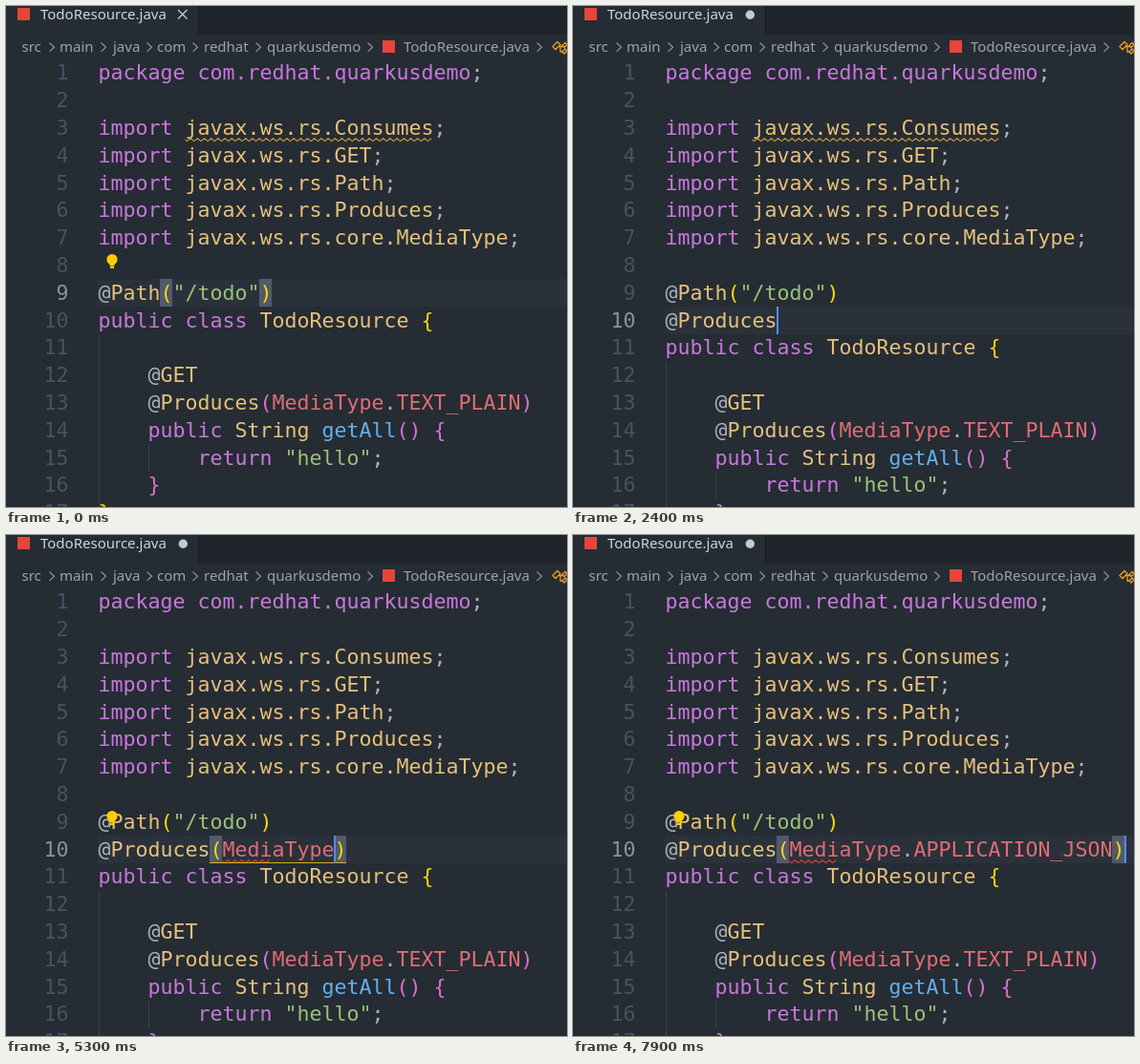
An HTML page that plays this animation: 587x525 px, repeating every 8000 ms.

```html
<!DOCTYPE html>
<html lang="en">
<head>
<meta charset="utf-8">
<title>Editor typing loop</title>
<style>
  html, body { margin: 0; width: 100%; height: 100%; overflow: hidden; background: #262c33; }
  svg { display: block; }
  text { white-space: pre; }
  .code { font: 21.6px "DejaVu Sans Mono", monospace; }
  .ui { font: 15px "Noto Sans", "Open Sans", sans-serif; }
  .match { font-weight: 700; fill: #d7dae0; }
</style>
</head>
<body>
<svg id="stage" width="587" height="525" viewBox="0 0 587 525"></svg>
<script>
const LOOP = 8000, SCALE = 1.2, LEFT = 96.4, CHAR = 13, LINE = 24 * SCALE;
const colors = {
  k: '#c678dd', y: '#e5c07b', g: '#abb2bf', s: '#98c379', r: '#e06c75',
  f: '#61afef', b: '#ffd70a', m: '#da70d6'
};
const colX = col => LEFT + col * CHAR;
const cellX = col => Math.round(colX(col));
const lineTop = n => Math.round(55.8 + LINE * (n - 1));
const baseline = n => Math.round(77.4 + LINE * (n - 1));

// A row is written as "color:text" pieces separated by "|".
const row = source => source ? source.split('|').map(p => [colors[p[0]], p.slice(2)]) : [];

const importRow = name => `k:import |y:javax.ws.rs.${name}|g:;`;
const head = [
  'k:package com.redhat.quarkusdemo|g:;', '',
  ...['Consumes', 'GET', 'Path', 'Produces', 'core.MediaType'].map(importRow), '',
  'g:@|y:Path|b:(|s:"/todo"|b:)'
];
const tail = [
  'k:public class |y:TodoResource |b:{', '',
  'g:    @|y:GET',
  'g:    @|y:Produces|m:(|r:MediaType|g:.|r:TEXT_PLAIN|m:)',
  'k:    public |y:String |f:getAll|m:() {',
  'k:        return |s:"hello"|g:;',
  'm:    }', 'b:}'
];

// Square brackets mark the letters that match what was typed.
const lists = {
  all: ['Override – java.lang', 'Deprecated – java.lang', 'Consumes – javax.ws.rs', 'GET – javax.ws.rs',
        'Path – javax.ws.rs', 'Produces – javax.ws.rs', 'Generated – javax.annotatio…'],
  p: ['[P]ath – javax.ws.rs', '[P]roduces – javax.ws.rs', '[P]arameters – org.junit.ru…', '[P]athParam – javax.ws.rs',
      '[P]rovider – javax.ws.rs.ext', '[P]riority – javax.annotation', '[P]ostConstruct – javax.ann…'],
  pro: ['[Pro]duces – javax.ws.rs', '[Pro]p – com.fasterxml.jacks…', '[Pro]pertyPrefix – com.arjun…',
        '[Pro]vider – javax.ws.rs.ext', '[Pro]xy – org.hibernate.anno…', '[Pr]i[o]rity – javax.annotation',
        'RestIs[Pro]duct – javax.mail…'],
  produ: ['[Produ]ces – javax.ws.rs', '[Produ]ces – javax.enterpris…'],
  medi: ['[Medi]aType – javax.ws.rs.core', '[Medi]a – javax.print.attribute', '[Medi]aName – javax.print.attr',
         '[Medi]aSize – javax.print.attr', '[Medi]aTray – javax.print.attr', '[Medi]aTracker – java.awt', '[Medi]aPrintableArea – javax'],
  fields: ['ATOM_XML', 'FORM_URLENCODED', 'JSON', 'JSON_PATCH_JSON', 'OCTET_STREAM', 'SVG_XML', 'XHTML_XML'].map(n => 'APPLICATION_' + n)
};
const jsonList = typed => ['', '_PATCH_JSON', '_TYPE', '_PATCH_JSON_TYPE']
  .map(end => `APPLICATION_[${typed}]${'JSON'.slice(typed.length)}${end}`);

const popup = (items, icon = 'interface') => ({ items, icon });
const args = inner => `g:@|y:Produces|b:(|${inner}|b:)`;

// Each step changes part of the editor state from its time on.
const steps = [
  [0, { line: null, row: 9, col: 14, pair: [5, 13], caret: false, dirty: false, bulb: 8,
        trail: true, warning: true, error: false, scope: false, popup: null }],
  [100, { caret: true }],
  [700, { line: '', row: 10, col: 0, pair: null }],
  [800, { dirty: true }],
  [1100, { line: 'g:@', col: 1 }],
  [1200, { line: 'r:@', bulb: 0 }],
  [1500, { popup: popup(lists.all) }],
  [1700, { line: 'g:@|y:p', col: 2, popup: popup(lists.p) }],
  [1800, { line: 'g:@|y:pro', col: 4, popup: popup(lists.pro) }],
  [2000, { line: 'g:@|y:produ', col: 6, popup: popup(lists.produ) }],
  [2400, { line: 'g:@|y:Produces', col: 9, popup: null }],
  [2500, { trail: false }],
  [3000, { line: 'g:@|y:Produces|r:()', col: 10, pair: [9, 10] }],
  [3300, { line: args('r:M'), col: 11, pair: [9, 11] }],
  [3400, { scope: true }],
  [3700, { line: args('r:Me'), col: 12, pair: [9, 12] }],
  [4000, { line: args('r:Medi'), col: 14, pair: [9, 14] }],
  [4200, { caret: false }],
  [4500, { popup: popup(null) }],
  [4700, { popup: popup(lists.medi, 'class'), trail: true, caret: true }],
  [4800, { bulb: 9 }],
  [5100, { warning: false, error: true }],
  [5300, { line: args('r:MediaType'), col: 19, pair: [9, 19], popup: null }],
  [5800, { caret: false }],
  [6000, { line: args('r:MediaType|g:.'), col: 20, pair: [9, 20], caret: true }],
  [6100, { popup: popup(lists.fields, 'constant') }],
  [6400, { line: args('r:MediaType|g:.j'), col: 21, pair: [9, 21], popup: popup(jsonList('J'), 'constant') }],
  [6500, { line: args('r:MediaType|g:.js'), col: 22, pair: [9, 22], popup: popup(jsonList('JS'), 'constant') }],
  [7100, { line: args('r:MediaType|g:.|r:APPLICATION_JSON'), col: 36, pair: [9, 36], popup: null, bulb: 0 }],
  [7500, { bulb: 9, caret: false }],
  [7900, { col: 37, caret: true, scope: false }]
];

const rect = (x, y, w, h, fill, more = '') => `<rect x="${x}" y="${y}" width="${w}" height="${h}" fill="${fill}" ${more}/>`;
const stroke = (d, color, width = 1.2) => `<path d="${d}" fill="none" stroke="${color}" stroke-width="${width}"/>`;
const circle = (x, y, r, fill, more = '') => `<circle cx="${x}" cy="${y}" r="${r}" fill="${fill}" ${more}/>`;
const text = (cls, x, y, fill, body, more = '') => `<text class="${cls}" x="${x}" y="${y}" fill="${fill}" ${more}>${body}</text>`;

function squiggle(from, to, line, color) {
  const bottom = lineTop(line + 1), half = 3 * SCALE, end = colX(to);
  let x = colX(from), d = `M${x} ${bottom - 2.2}`;
  x += 1.75 * SCALE;
  for (let i = 0; x <= end; i++, x += half) d += `L${x} ${bottom - (i % 2 ? 3.3 : 0.4)}`;
  return stroke(d, color, 1.1);
}

function drawHeader(s) {
  const crumbs = [[16.5, 'src'], [56, 'main'], [112, 'java'], [158, 'com'], [207, 'redhat'], [273, 'quarkusdemo'], [416, 'TodoResource.java']];
  const chevrons = [48, 102, 150, 198, 264, 381];
  if (s.trail) chevrons.push(558);
  let out = rect(201, 0, 386, 30, '#20252b') + rect(201, 0, 1, 30, '#181a1f')
    + rect(12, 2, 13, 13, '#e5453b') + rect(394, 36, 13, 13, '#e5453b')
    + text('ui', 36, 14, '#d0d4dc', 'TodoResource.java')
    + (s.dirty ? circle(185.3, 9.3, 4.7, '#c5c9d0') : stroke('M180 4l9.5 9.5M189.5 4l-9.5 9.5', '#c5c9d0', 1.3));
  out += crumbs.map(([x, name]) => text('ui', x, 48, '#9da3ae', name)).join('');
  out += chevrons.map(x => stroke(`M${x - 2.5} 38.5l5 4.7l-5 4.7`, '#8e949f')).join('');
  if (s.trail) out += stroke('M572 42.5l5-5l3 3l-5 5zM578.5 42.5h4M580 42.5v5.5h3M582 41.5l3-3l2 2l-3 3zM582 48l3-3l2 2l-3 3z', '#ee9d28', 1.3);
  return out;
}

function drawCode(s) {
  const inserted = s.line !== null;
  const rows = inserted ? [...head, s.line, ...tail] : [...head, ...tail];
  const body = inserted ? 12 : 11;
  const top = lineTop(s.row), bottom = lineTop(s.row + 1);
  let out = rect(96, top, 491, bottom - top, '#2b313a')
    + rect(97, lineTop(body), 1, 300, '#3b4048')
    + rect(149, lineTop(body + 4), 1, 29, '#3b4048');
  if (s.pair) out += s.pair.map(c => rect(cellX(c), top, CHAR, bottom - top, '#515a6b')).join('');
  rows.slice(0, 17).forEach((source, i) => {
    const n = i + 1, y = baseline(n);
    const spans = row(source).map(([fill, t]) => `<tspan fill="${fill}">${t}</tspan>`).join('');
    out += text('code', 65.5, y, n === s.row ? '#8b919c' : '#495162', n, 'text-anchor="end"')
      + text('code', LEFT, y, colors.g, spans);
  });
  if (s.warning) out += squiggle(7, 27, 3, '#d19a3e');
  if (s.error) out += squiggle(10, 14, 10, '#e0403c');
  if (s.scope) out += rect(cellX(s.pair[0]), bottom - 1, cellX(s.pair[1] + 1) - cellX(s.pair[0]), 1, '#d6b21b');
  if (s.caret) out += rect(cellX(s.col), top, 2, bottom - top, '#528bff');
  if (s.bulb) {
    const y = lineTop(s.bulb) + 8.5;
    out += circle(111, y, 5.6, '#ffcc00')
      + `<path d="M108 ${y + 3}h6l-.7 4h-4.6zM109 ${y + 7.6}h4v1.8h-4z" fill="#ffcc00"/>`;
  }
  return out;
}

const icons = {
  interface: (x, y) => circle(x + 10.8, y, 2.3, '#75beff') + stroke(`M${x + 12} ${y}h5`, '#75beff', 1.5)
    + circle(x + 20.8, y, 3.6, 'none', 'stroke="#75beff" stroke-width="1.5"'),
  class: (x, y) => stroke(`M${x + 10} ${y}l5-5l3.5 3.5l-5 5zM${x + 17} ${y - 2}h7M${x + 20} ${y - 2}v7h4`, '#ee9d28', 1.4),
  constant: (x, y) => rect(x + 9.6, y - 6, 15, 12, 'none', 'rx="1.5" stroke="#c5c9d0" stroke-width="1.4"')
    + stroke(`M${x + 12.9} ${y - 1.8}h8.5M${x + 12.9} ${y + 2}h8.5`, '#c5c9d0', 1.3)
};

// The popup snaps to whole layout pixels, which the zoom then scales.
function drawPopup({ items, icon }, caretX) {
  const x = SCALE * Math.floor(caretX / SCALE + 0.01), edge = Math.round(x);
  const top = 345, width = 395, count = items ? items.length : 1;
  let out = rect(edge + 0.5, top - 0.5, width, LINE * count + 1, '#20252b', 'stroke="#181a1f"');
  if (!items) return out + text('ui', edge + 28.5, 365, '#abb2bf', 'Loading...');
  out += rect(edge + 1, top, width - 1, LINE, '#2b313a');
  if (count > 6) out += rect(edge + 383, top, 12, 180, '#30353d');
  items.forEach((item, i) => {
    const body = item.split(/[\[\]]/).map((part, j) => j % 2 ? `<tspan class="match">${part}</tspan>` : part).join('');
    out += icons[icon](x, top + LINE * i + 14.6)
      + text('code', Math.floor(x + 31.4), Math.round(366.6 + LINE * i), '#abb2bf', body);
  });
  return out;
}

const stage = document.getElementById('stage');
let shown = -1;

function render(time) {
  const past = steps.filter(([at]) => at <= time);
  if (past.length === shown) return;
  shown = past.length;
  const s = Object.assign({}, ...past.map(step => step[1]));
  stage.innerHTML = drawHeader(s) + drawCode(s) + (s.popup ? drawPopup(s.popup, colX(s.col)) : '');
}

let start;
function tick(now) {
  start ??= now;
  render((now - start) % LOOP);
  requestAnimationFrame(tick);
}
render(0);
requestAnimationFrame(tick);
</script>
</body>
</html>
```
